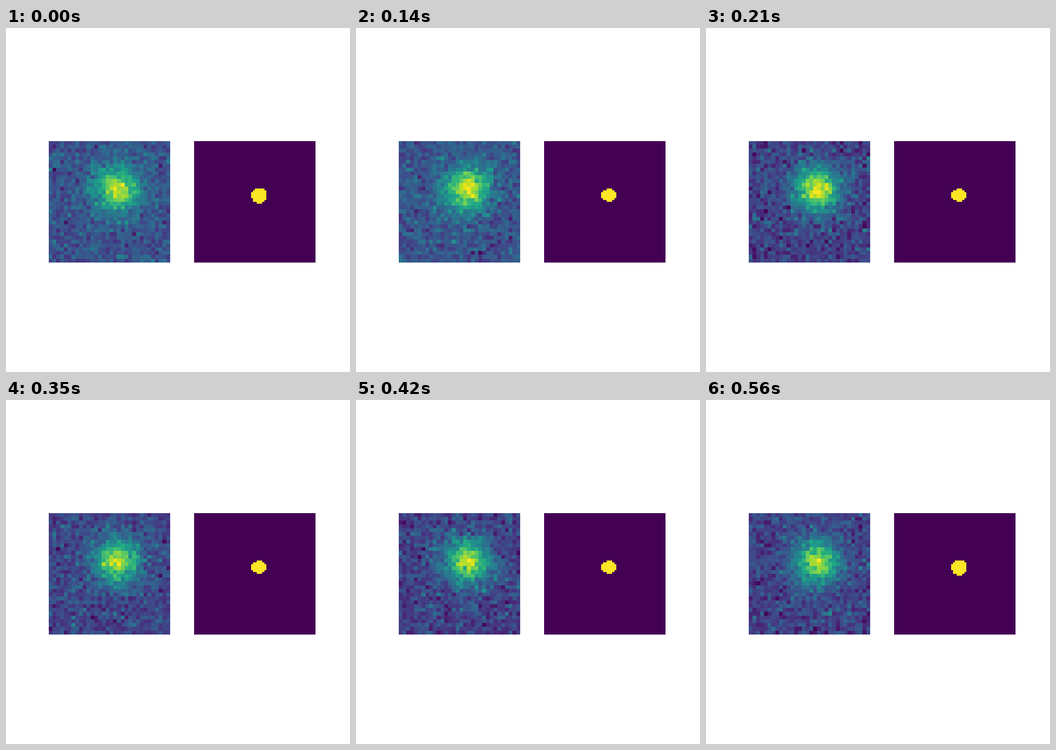
A matplotlib script for the animation above (0.63 s loop, 748 px wide and 748 px high).

```python
import numpy as np
import matplotlib.pyplot as plt
from matplotlib.animation import FuncAnimation

SIZE, PANEL = 748, 264
FRAMES, STEP = 9, 70


def radii(n, cx, cy):
    """Squared horizontal and vertical distances of n x n cells from a centre."""
    y, x = np.mgrid[:n, :n]
    return (x - cx) ** 2, (y - cy) ** 2


def spot(i):
    rng = np.random.default_rng(40 + i)
    r2 = sum(radii(32, 17.5, 12.2))
    glow = 0.58 * np.exp(-r2 / 28) + 0.10 * np.exp(-r2 / 90)
    return 0.22 + glow + rng.normal(0, 0.07, r2.shape)


def mask(i):
    # Every fourth step the disc is round, otherwise slightly flattened
    if i % 4 == 0:
        cx, cy, r, squash = 33.8, 28.3, 4.1, 1.0
    else:
        cx, cy, r, squash = 33.6, 28.0, 3.8, 1.33
    dx2, dy2 = radii(64, cx, cy)
    return dx2 + squash * dy2 < r * r


def panel(left, bottom, data):
    # The small inset keeps the image on whole pixels
    box = np.array([left + 0.05, bottom + 0.05, PANEL - 0.1, PANEL - 0.1])
    ax = fig.add_axes(box / SIZE)
    ax.axis("off")
    return ax.imshow(data, cmap="viridis", interpolation="nearest",
                     aspect="auto")


fig = plt.figure(figsize=(SIZE / 100, SIZE / 100), dpi=100, facecolor="white")
sky = panel(93, 238, spot(0))
disc = panel(409, 238, mask(0))


def update(i):
    sky.set_data(spot(i))
    sky.autoscale()
    disc.set_data(mask(i))
    return sky, disc


anim = FuncAnimation(fig, update, frames=FRAMES, interval=STEP,
                     repeat=True, repeat_delay=0)
plt.show()
```
